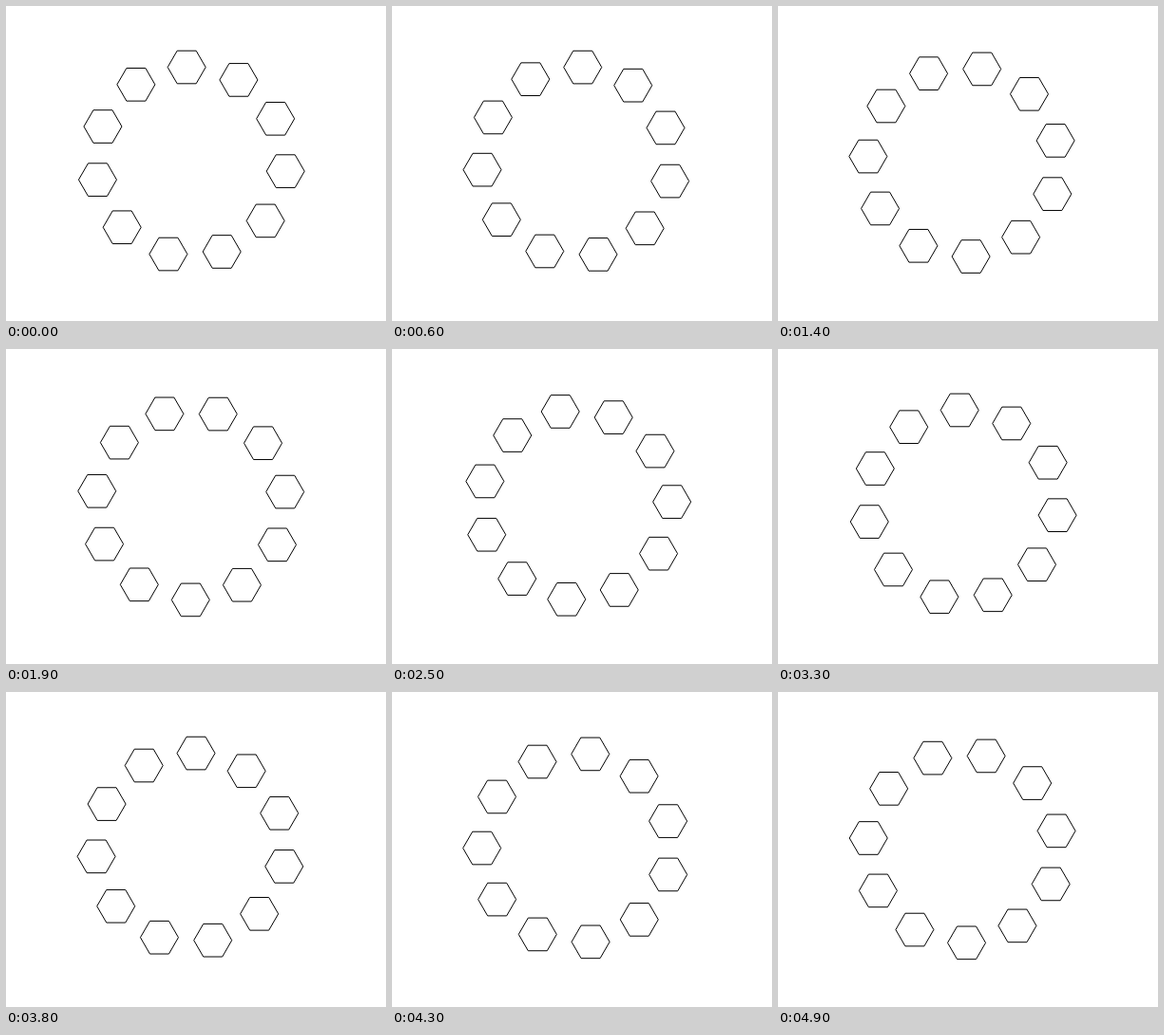
These frames come from a looping animation (400x332 px, 5 s). An HTML page:

```html
<!DOCTYPE html>
<html lang="en">
<head>
<meta charset="utf-8">
<title>Hexagon ring</title>
<style>
  html, body { margin: 0; width: 100%; height: 100%; overflow: hidden; background: #fff; }
  svg { display: block; width: 400px; height: 332px; }
  polygon { fill: none; stroke: #000; stroke-width: 1; }
</style>
</head>
<body>
<svg viewBox="0 0 400 332"></svg>
<script>
const COUNT = 11, RADIUS = 100, SIZE = 20;
const CENTER = { x: 194.7, y: 164.4 };
const LOOP = 5000, STEP = 100;
const START = -2.6, TURN = 1.01; // degrees, clockwise from the top
const NS = 'http://www.w3.org/2000/svg';
const svg = document.querySelector('svg');
const rad = deg => deg * Math.PI / 180;

const corners = Array.from({ length: 6 }, (_, i) =>
  `${SIZE * Math.cos(rad(i * 60))},${SIZE * Math.sin(rad(i * 60))}`).join(' ');

const hexagons = Array.from({ length: COUNT }, () => {
  const hex = document.createElementNS(NS, 'polygon');
  hex.setAttribute('points', corners);
  return svg.appendChild(hex);
});

function draw(time) {
  const step = Math.floor((time % LOOP) / STEP);
  hexagons.forEach((hex, i) => {
    const a = rad(START + step * TURN + i * 360 / COUNT);
    const x = CENTER.x + RADIUS * Math.sin(a);
    const y = CENTER.y - RADIUS * Math.cos(a);
    hex.setAttribute('transform', `translate(${x} ${y})`);
  });
}

const begin = performance.now();
function tick() {
  draw(performance.now() - begin);
  requestAnimationFrame(tick);
}
tick();
</script>
</body>
</html>
```
